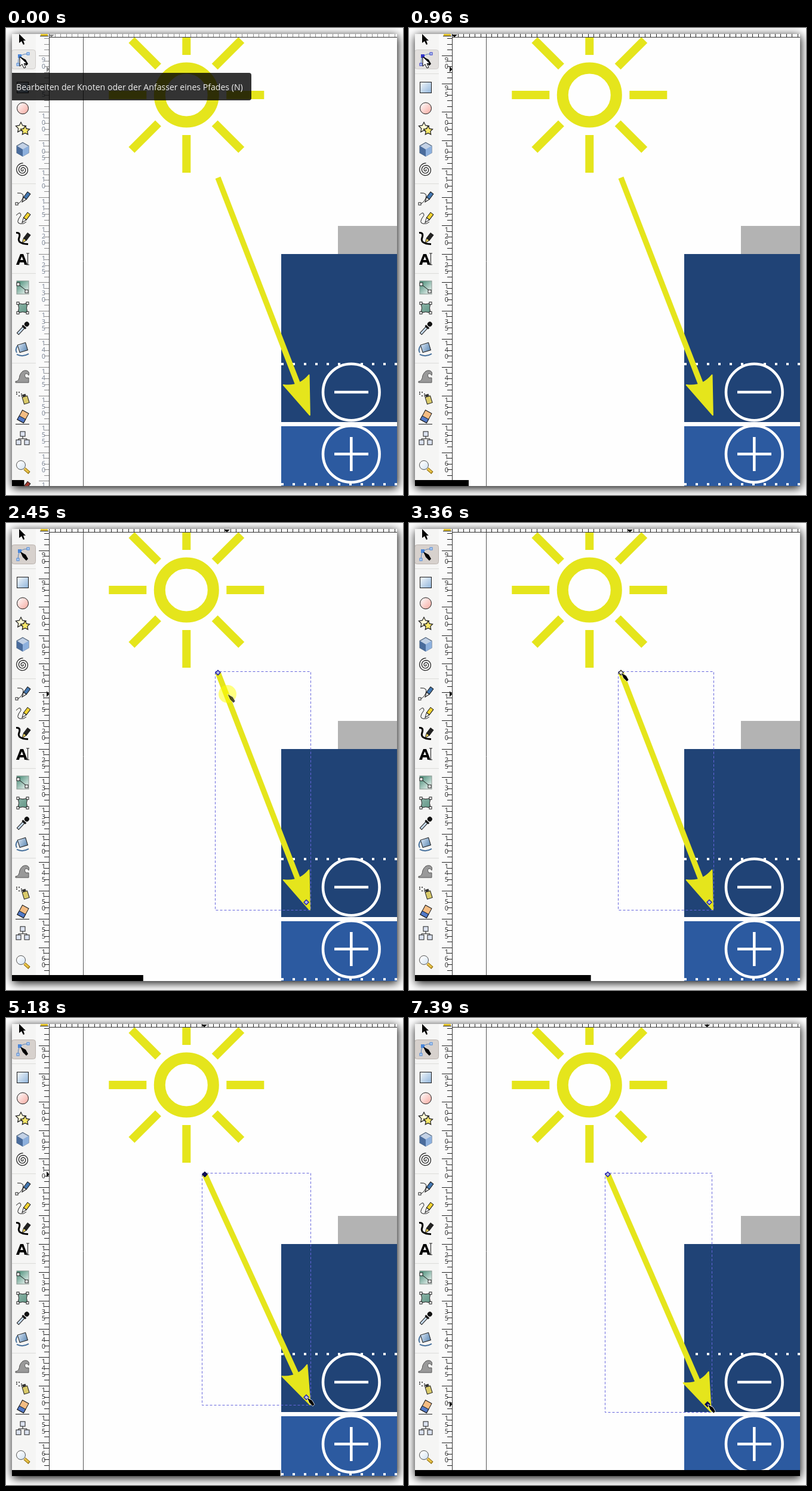
Animation, 665 px wide and 781 px high, one loop 7.47 s. Source, as an HTML page with a canvas:

```html
<!DOCTYPE html>
<html lang="de">
<head>
<meta charset="utf-8">
<title>Knoten bearbeiten</title>
<style>
html, body { margin: 0; width: 100%; height: 100%; overflow: hidden; background: #fff; }
canvas { display: block; width: 665px; height: 781px; }
</style>
</head>
<body>
<canvas id="stage" width="665" height="781"></canvas>
<script>
const c = document.getElementById('stage').getContext('2d');
const LOOP = 7470, STEP = 183.3, SYNC = 780;
const YELLOW = '#e5e51c', INK = '#1c1c1c', UNIT = 9.49;

// Places the pointer visits
const TOOL = [23, 48], HOVER = [374, 257], PATH = [371, 286];
const START = [355, 250.3], START2 = [333, 261.5];
const END = [503.8, 634.3], END2 = [500.3, 646];

const route = [[960, 1500, HOVER], [1700, 2060, PATH], [2440, 2990, START],
  [3550, 3890, START2], [4460, 5000, END], [5540, 6280, END2]];

function glide(t, t0, t1, a, b) {
  const f = Math.min(1, Math.max(0, (t - t0) / (t1 - t0)));
  const k = f * f * (3 - 2 * f);
  return a.map((v, i) => v + (b[i] - v) * k);
}

const pointerAt = t => route.reduce((p, [t0, t1, q]) => glide(t, t0, t1, p, q), TOOL);
const during = (t, a, b) => t >= a && t < b;

function rect(x, y, w, h, fill, stroke) {
  if (fill) { c.fillStyle = fill; c.fillRect(x, y, w, h); }
  if (stroke) { c.strokeStyle = stroke; c.lineWidth = 1; c.strokeRect(x, y, w, h); }
}

function line(x1, y1, x2, y2, color = INK, w = 1) {
  c.strokeStyle = color;
  c.lineWidth = w;
  c.beginPath();
  c.moveTo(x1, y1);
  c.lineTo(x2, y2);
  c.stroke();
}

function disc(x, y, r, fill, stroke, w = 1) {
  c.beginPath();
  c.arc(x, y, r, 0, 7);
  if (fill) { c.fillStyle = fill; c.fill(); }
  if (stroke) { c.strokeStyle = stroke; c.lineWidth = w; c.stroke(); }
}

function shape(d, fill, stroke, w = 1) {
  const p = new Path2D(d);
  if (fill) { c.fillStyle = fill; c.fill(p); }
  if (stroke) { c.strokeStyle = stroke; c.lineWidth = w; c.stroke(p); }
}

// Closed or open curve from a polar radius function
function polar(x, y, count, radius, step, fill, stroke) {
  const pts = Array.from({ length: count }, (_, i) => {
    const a = i * step - Math.PI / 2, r = radius(i);
    return (x + r * Math.cos(a)) + ' ' + (y + r * Math.sin(a));
  });
  shape('M' + pts.join('L') + (fill ? 'Z' : ''), fill, stroke, 1.2);
}

function placed(x, y, turn, paint) {
  c.save();
  c.translate(x, y);
  c.rotate(turn);
  paint();
  c.restore();
}

function fade(r, a, b) {
  const g = c.createLinearGradient(-r, -r, r, r);
  g.addColorStop(0, a);
  g.addColorStop(1, b);
  return g;
}

const wedge = 'M0 0L9 5L13 12L10 15L4 9Z';
const star = (x, y, r, fill) => polar(x, y, 10, i => i % 2 ? r * .5 : r, Math.PI / 5, fill, INK);

function pen(body, nib) {
  placed(-1, 7, .65, () => {
    shape('M0 0L-3-8H3Z', nib, INK);
    rect(-3, -19, 6, 11, body, INK);
  });
}

function corners(r, size, fill) {
  for (const x of [-r, r]) for (const y of [-r, r]) rect(x - size / 2, y - size / 2, size, size, fill, INK);
}

const drawTools = [
  () => {
    rect(-9.5, -9.5, 19, 18, fade(9, '#f4f8fc', '#8fb4da'), INK);
  },
  () => disc(0, 0, 9.5, fade(9, '#fff', '#f7a9a0'), INK),
  () => {
    star(-3, -2, 9, '#fffbd8');
    star(4, 3, 8, '#f8e86a');
  },
  () => {
    polar(0, 0, 6, () => 11.5, Math.PI / 3, '#c3d2e6', '#55677d');
    shape('M0 0L-10-6V6L0 12Z', '#4a6c9c');
    shape('M0 0L10-6V6L0 12Z', '#8db0dd');
  },
  () => polar(0, 0, 64, i => i * .18, .3, null, INK),
  () => {
    shape('M-9-8Q4-9 0 1Q-4 9-9 10', null, INK);
    rect(-12, 8, 4, 4, '#fff', INK);
    pen('#4377b1', '#eee');
  },
  () => {
    shape('M-11-5Q-3-13-3-5Q-13 8-4 9Q2 10 6 6', null, INK);
    pen('#f2d331', '#fff');
  },
  () => {
    shape('M-11-10Q-3-11-6-2Q-10 8 9 9', null, '#000', 3);
    pen('#222', '#f1d65c');
  },
  () => {
    shape('M-11 9L-4-9H1L8 9H3L2 5H-5L-6 9ZM-4 1H1L-1.5-5Z', '#000');
    shape('M6-10H11M8.5-10V9M6 9H11', null, INK);
  },
  () => {
    rect(-10, -11, 20, 22, fade(10, '#418872', '#f8fbfa'), '#8a9690');
    line(-7, -5, 7, 6);
    rect(-10, -8, 5, 5, '#fff', INK);
    rect(4, 4, 5, 5, '#fff', INK);
  },
  () => {
    shape('M-8-8Q0-5 8-8Q5 0 8 8Q0 5-8 8Q-5 0-8-8Z', fade(9, '#8fb5a9', '#5f9685'), INK);
    corners(8, 4, '#fff');
  },
  () => placed(0, 0, .75, () => {
    rect(-2, -2, 4, 14, '#c8dcf0', INK);
    rect(-4, -5, 8, 3, '#111');
    disc(0, -10, 4, '#111');
  }),
  () => {
    placed(0, -2, -.3, () => rect(-7, -7, 14, 13, fade(8, '#dce9f7', '#527fac'), INK));
    shape('M-9-5Q-13 1-10 6M-10 9Q0 14 10 8', null, '#47719d', 2);
  },
  () => {
    shape('M-12 8Q-6 8-5-2Q-1-12 7-10Q12-8 10-2Q8-6 5-5Q2-3 5 2H10V10H-12Z', '#999', '#555');
  },
  () => {
    placed(4, 3, -.3, () => {
      rect(-4, -4, 9, 12, '#d9ca6a', INK);
      rect(-3, -8, 6, 4, '#333');
    });
    for (let i = 0; i < 6; i++) disc(-10 + i % 3 * 4, -8 + (i >> 1) * 3, 1, INK);
  },
  () => {
    placed(0, -1, .5, () => {
      rect(-6, -10, 12, 18, '#f4bd83', INK);
      rect(-6, 1, 12, 7, '#5279c7', INK);
    });
    line(-12, 11, 11, 11);
  },
  () => {
    shape('M0-4V1M-7 4V1H7V4', null, INK);
    for (const [x, y] of [[0, -7], [-7, 7], [7, 7]]) rect(x - 4, y - 4, 8, 8, '#dce3f1', INK);
  },
  () => {
    line(3, 3, 11, 10, '#92700f', 5);
    line(3, 3, 10, 9, '#e9c349', 3);
    disc(-3, -3, 7.5, fade(8, '#fff', '#c3d8ed'), '#555');
  },
  () => pen('#a03b32', '#fff')
];

const groupStarts = [100, 284, 434, 583, 734], groupSizes = [5, 4, 4, 4, 2];

function nodeTool(t) {
  const fresh = t < 200, calm = t < 1140;
  c.beginPath();
  c.roundRect(9.5, 36.5, 40, 32, 4);
  c.fillStyle = fresh ? '#e9e8e6' : calm ? '#e3e0de' : '#d7d1cd';
  c.fill();
  c.strokeStyle = calm ? '#d0cdcb' : '#bbb3ae';
  c.lineWidth = 1;
  c.stroke();
  const blue = !fresh && calm ? '#3434c8' : '#4a86d8';
  placed(28, 52, 0, () => {
    shape('M-8 9Q-8 0-5-5Q2-9 9-9', null, '#5a82b8');
    rect(-10, 7, 4, 4, '#bcd5f3', blue);
    rect(7, -11, 4, 4, '#bcd5f3', blue);
    rect(-8, -8, 6, 6, blue);
  });
  placed(24, 48, 0, () => shape(wedge, '#000'));
}

function toolbar(t) {
  rect(10, 10, 40, 756, '#f5f5f4');
  for (const y of [76.5, 260.5, 410.5, 560.5]) line(10, y, 50, y, '#dcdcda');
  placed(27, 18, 0, () => shape('M-5-8V7L-1 4L2 10L4 9L2 3H6Z', '#000'));
  nodeTool(t);
  let i = 0;
  groupStarts.forEach((y, g) => {
    for (let n = 0; n < groupSizes[g]; n++) placed(28, y + n * 34.3, 0, drawTools[i++]);
  });
}

function frame() {
  rect(0, 0, 665, 781, '#fff');
  c.save();
  c.shadowColor = '#000';
  c.shadowBlur = 15;
  c.shadowOffsetX = 1;
  c.shadowOffsetY = 3;
  rect(10, 10, 645, 756, '#fefefe');
  c.restore();
}

function rulers(dim, [mx, my]) {
  const ink = dim ? '#8d8d8d' : '#222';
  rect(50, 10, 23, 756, '#fafafa');
  rect(73, 10, 582, 5, '#fafafa');
  c.font = '11px "Noto Sans", "Open Sans", sans-serif';
  c.textAlign = 'center';
  for (let j = -3; j < 77; j++) {
    const y = Math.round(45.5 + j * UNIT) + .5;
    line(j % 5 ? 64 : 55, y, 73, y, ink);
    if (j >= 0 && j % 5 === 0) {
      c.fillStyle = dim ? '#7d8798' : '#333';
      [...String(90 + j)].forEach((d, n) => c.fillText(d, 63, y + 10 + n * 11.4));
    }
  }
  // Zero sits on the page border
  for (let x = 129 - 5 * UNIT; x < 655; x += UNIT) {
    const px = Math.round(x) + .5;
    line(px, 10, px, 15, ink);
  }
  line(72.5, 10, 72.5, 766, '#333');
  line(73, 15.5, 655, 15.5, '#333');
  rect(58, 10, 12, 3, '#e8c72e');
  line(57, 13.5, 71, 13.5);
  const tri = dim ? '#888' : '#111';
  placed(mx, 11, 0, () => shape('M-5 0H5L0 4.5Z', tri));
  placed(68, my, 0, () => shape('M0-5V5L4.5 0Z', tri));
}

function sun() {
  disc(302.3, 112, 45, null, YELLOW, 19);
  for (let i = 0; i < 8; i++) {
    placed(302.3, 112, i * Math.PI / 4, () => line(67, 0, 130, 0, YELLOW, 14));
  }
}

function battery() {
  rect(556, 331, 99, 47, '#b3b3b3');
  rect(461, 378, 194, 281, '#204376');
  rect(461, 659, 194, 7, '#fff');
  rect(461, 666, 194, 100, '#2c5aa0');
  for (const y of [560, 761]) for (let x = 461; x < 655; x += 19) rect(x, y, 4, 4, '#fff');
  for (const y of [609, 712.5]) {
    disc(578.3, y, 47.3, null, '#fff', 4.6);
    line(550, y, 607, y, '#fff', 4.6);
  }
  line(578.3, 684, 578.3, 741, '#fff', 4.6);
}

function arrow(s, e) {
  const a = Math.atan2(e[1] - s[1], e[0] - s[0]);
  const length = Math.hypot(e[0] - s[0], e[1] - s[1]);
  c.lineJoin = 'round';
  placed(...s, a, () => line(0, 0, length - 38, 0, YELLOW, 9.4));
  placed(...e, a, () => shape('M14 0L-49 23Q-36 0-49-23Z', YELLOW, YELLOW, 2));
  c.lineJoin = 'miter';
}

function node(p, [fill, stroke]) {
  placed(Math.floor(p[0]), p[1], 0, () => shape('M0-4L4 0L0 4L-4 0Z', fill, stroke, 1.4));
}

function selection(t, s, e) {
  const x = Math.floor(s[0] - 4.4) + .5, y = Math.floor(s[1] - 1.7) + .5;
  c.setLineDash([4, 3]);
  rect(x, y, Math.floor(e[0] + 6.7) + .5 - x, Math.floor(e[1] + 13.3) + .5 - y, null, '#6666dc');
  c.setLineDash([]);
  const plain = ['#b5b9e8', '#2222a8'], picked = ['#101060', '#08083c'], hover = ['#e4e4e4', '#333'];
  node(s, during(t, 2990, 4050) ? hover : during(t, 4050, 5600) ? picked : plain);
  node(e, t > 5600 ? picked : plain);
}

function tooltip() {
  c.fillStyle = 'rgba(0,0,0,.8)';
  c.beginPath();
  c.roundRect(10, 75, 401, 46, [0, 4, 4, 0]);
  c.fill();
  c.font = '14.1px "Open Sans", "Noto Sans", sans-serif';
  c.textAlign = 'left';
  c.fillStyle = '#f0f0f0';
  c.fillText('Bearbeiten der Knoten oder der Anfasser eines Pfades (N)', 17, 104);
}

function cursor(t, p) {
  const down = during(t, 2060, 2440) || during(t, 3600, 4250) || during(t, 5600, 6600);
  if (down) disc(...p, 15, 'rgba(255,255,0,.5)');
  c.globalAlpha = down ? .7 : 1;
  placed(...p, 0, () => {
    if (t < 1140) shape('M0 0V16L4 12.5L7 19L10 18L7 11.5H12Z', '#fff', '#000');
    else shape(wedge, '#000', '#fff', .8);
  });
  c.globalAlpha = 1;
}

// Ruler markers stand still while a selected path is hovered
function markers(t) {
  const seen = during(t, 2060, 3550) ? 2060 : during(t, 3890, 5540) ? 3890 : t;
  const [x, y] = pointerAt(seen);
  return [Math.max(76, x - 1), Math.max(69, y)];
}

function draw(now) {
  const n = Math.floor((now - SYNC) / STEP + 1e-4);
  const t = Math.max(0, SYNC + n * STEP);
  const s = glide(t, 3550, 3890, START, START2), e = glide(t, 5540, 6280, END, END2);
  frame();
  c.save();
  c.beginPath();
  c.rect(10, 10, 645, 756);
  c.clip();
  line(129.5, 15, 129.5, 766, '#555');
  sun();
  battery();
  arrow(s, e);
  if (during(t, 1500, 2300)) line(...s, ...e, '#f5401c', 1.2);
  if (t > 2400) selection(t, s, e);
  rulers(t < 40, markers(t));
  toolbar(t);
  if (t < 200) tooltip();
  cursor(t, pointerAt(t));
  rect(10, 756, 90 + n * (14.1 + .037 * n), 10, '#000');
  c.restore();
}

const begin = performance.now();
function tick() {
  draw((performance.now() - begin) % LOOP);
  requestAnimationFrame(tick);
}
tick();
</script>
</body>
</html>
```
